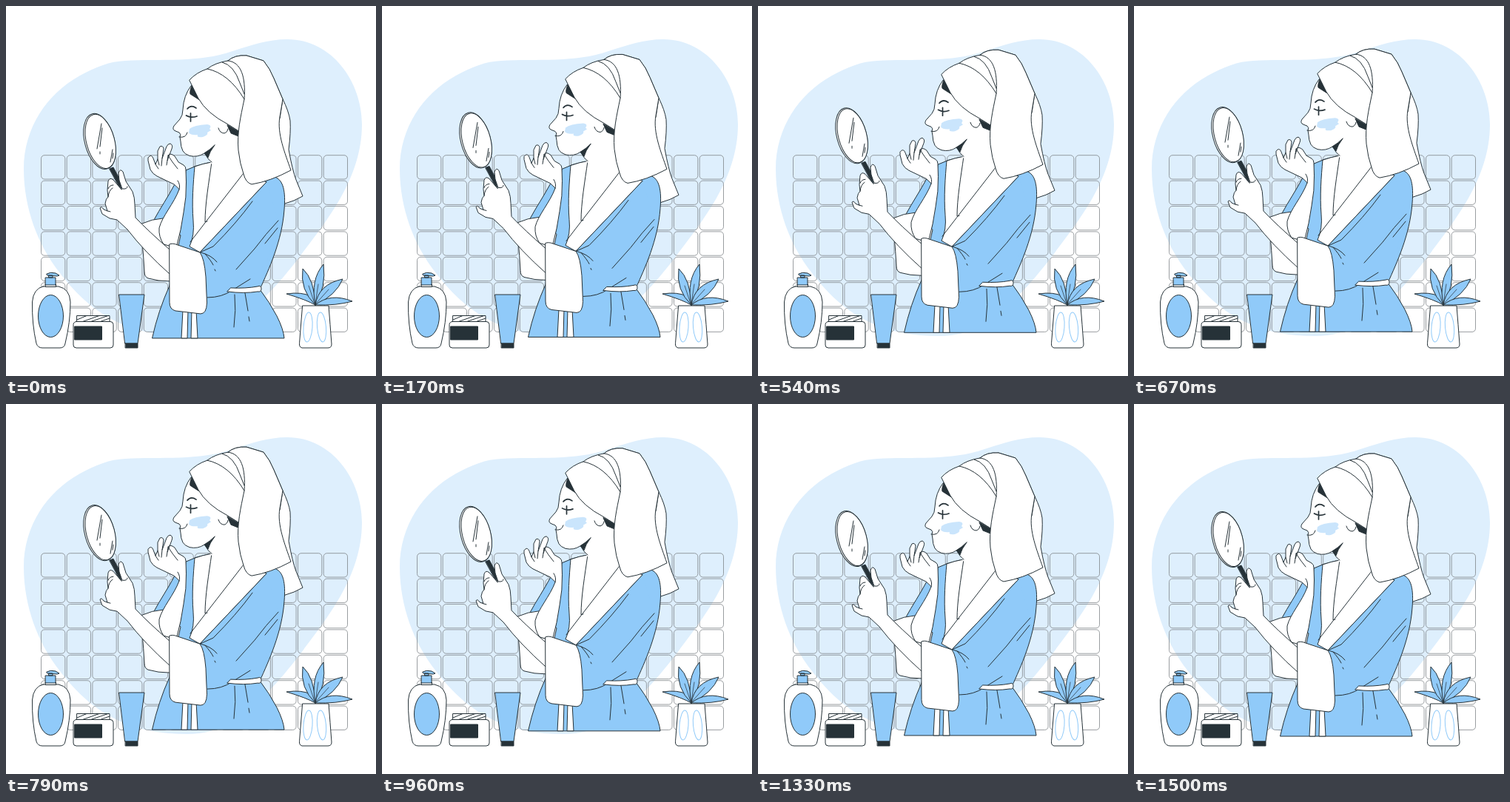
These frames come from a looping animation (500 by 500 pixels, 1.54 s). An HTML page:

```html
<!DOCTYPE html>
<html lang="en">
<head>
<meta charset="utf-8">
<title>Skin care</title>
<style>
  html, body { margin: 0; height: 100%; overflow: hidden; background: #fff; }
  svg { display: block; width: 100vw; height: 100vh; }
  .art { fill: #fff; stroke: #263238; stroke-width: 1; stroke-linecap: round; stroke-linejoin: round; }
  .blue { fill: #90caf9; }
  .dark { fill: #263238; }
  .line { fill: none; }
  #tiles { fill: none; stroke: #80868a; stroke-width: .8; }
</style>
</head>
<body>
<svg viewBox="0 0 500 500">
  <path fill="#deeffd" d="M24 220C24 165 55 119 100 94C122 82 140 75 161 74C210 71 261 77 306 61C331 53 354 45 380 45C441 45 481 103 481 160C481 235 430 294 396 340C383 357 367 376 353 390C322 424 290 446 245 446C160 446 112 412 73 361C43 323 24 273 24 220Z"/>
  <g id="tiles"></g>

  <g id="woman" class="art">
    <!-- towel end behind the shoulder -->
    <path d="M374 126Q382 142 384 155Q385 171 382 194Q387 222 392 235L401 257Q389 264 377 267L340 220Z"/>

    <!-- far sleeve and robe -->
    <path class="blue" d="M228 241C219 258 208 274 200 289L214 300L240 250Z"/>
    <path class="blue" d="M273 212Q257 215 243 222L236 300L221 378Q206 411 197.500 449H376Q375 437 366 419Q356 400 343 383C355 356 373 318 376 275C378 251 375 235 363 231L320 226Z"/>
    <path d="M184 294Q197 288 212 287L236 310L222 372Q205 372 192 368Q187 366 187 359Q186 340 184 318Z"/>

    <!-- neck and lapels -->
    <path d="M255 217Q266 213 278 211L323 224L352 238L262 333L248 325Q255 310 253 290C251 265 253 240 255 217Z"/>
    <path class="line" d="M278 211C274 239 269 268 269 292L272 291M321 226L269 293L249 319"/>
    <path stroke="none" d="M268 196L302 160L325 180V226L278 214Z"/>
    <path class="line" d="M269 199Q272 207 278 211"/>

    <!-- raised arm -->
    <path d="M234 248C227 267 211 284 207 300Q206 312 213 322L230 327Q237 302 240 279Q244 258 243.500 238L243 221Q243 217 240 215L233 211L228 203Q222 198 219 202L218 209L224 193Q226 188 222 186Q219 186 217 190L211 206L213 193Q212 188 208 190L205 196V207L202 214L199 206Q197 201 194 203Q191 204 192 209L195 221Q198 227 204 230L227 241Z"/>
    <path class="line" d="M202 214L206 220M205 207L207 215M211 206L210 216M218 209L217 215M219 202L225 211L232 220M234 248Q236 242 232 236"/>

    <!-- mirror -->
    <path class="dark" d="M140 220L145 218L156 239L154 246Z"/>
    <ellipse cx="126.500" cy="183" rx="20" ry="38.500" transform="rotate(-15 126.500 183)"/>
    <ellipse cx="127.700" cy="183" rx="19" ry="37.500" transform="rotate(-15 127.700 183)"/>
    <path class="line" d="M129 159L123 193M130 165L127 190M127 197V200M144 194L141 211M145 199L144 206"/>

    <!-- arm with mirror -->
    <path d="M153 236L152 226Q154 219 158 224L162 237L171 251Q174 259 174 268L175 286Q192 304 222 330V363Q187 332 164 302L150 289L140 287L130 281L127 273Q129 270 132 275L137 277L134 267Q135 260 138 258L137 249L138 237Q140 231 145 235L156 248Z"/>
    <path class="line" d="M138 258Q139 249 144 246M138 247Q140 242 145 242M137 277L141 278M153 236L157 247Q164 248 164 244"/>

    <!-- near sleeve, cuff, belt -->
    <path class="blue" stroke="none" d="M352 238L262 333L272 394Q296 394 308 384L352 348L368 290Z"/>
    <path class="line" d="M352 238L262 333M272 394Q292 394 306 384L330 369M333 264Q311 294 280 325L262 333M368 290Q351 308 336 328L311 356M367 300L350 321M263 333Q278 337 285 346M269 335Q277 344 280 350M282 356L283 358"/>
    <path d="M239 411L237 449H245L246 411ZM251 411L250 449H259L257 411Z"/>
    <path d="M221 322Q225 320 232 323L262 333Q268 341 270 366L271.500 401Q271 416 263 416L229 412Q221 410 221 401Z"/>
    <path d="M304 381Q324 382 340 379Q345 377 345 382T340 386Q322 389 299 386Z"/>
    <path class="line" d="M309 390Q311 411 308 434M323 388L327 412M328 420L329 426"/>

    <!-- head -->
    <path d="M250 108Q240 121 239 140Q239 148 235 153L227 162Q224 167 229 169L234 171Q237 173 235 177L236 183Q236 190 239 196Q241 200 248 202.500Q259 205 268 199Q278 194 284 187L308 168L300 120Z"/>
    <path stroke="none" d="M271 198L286 174L308 160V190H284Z"/>
    <path class="dark" d="M282 188Q276 194 268 199L273 205Q275 197 282 188ZM251 108Q248 115 249 119L263 128ZM299 161L304 172L314 176V169Z"/>
    <path class="line" d="M287 165Q289 172 295 172Q299 171 300 166M234 177Q243 179 245 171"/>
    <path class="line" stroke-width="1.700" d="M245 139Q250 133 257 138M243.500 148Q250 152 258 149M249.500 145V156"/>
    <path fill="#cae5fc" stroke="none" d="M248 166Q254 161 272 160Q279 161 275 166L277 168L272 171Q274 174 266 177Q257 178 259 174Q250 175 247 171Z"/>

    <!-- towel -->
    <path d="M248 100Q257 90 272 85Q282 77 300 74Q309 66 325 67L348 74Q357 85 362 98L374 126L370 152L316 170L300 160Q271 145 260 125Z"/>
    <path d="M300 74C318 76 324 96 322 126C317 150 312 171 314 195Q316 213 321 227Q324 239 332 241Q357 237 385 222C377 199 366 172 370 150L374 126L362 98Q357 85 348 74L325 67Q309 66 300 74Z"/>
    <path class="line" d="M272 85Q301 91 322 126M292 76Q308 80 316 104L322 119"/>
  </g>

  <!-- bottle -->
  <g class="art">
    <path d="M50 379H71Q86 382 87 400Q87 427 80 456Q79 462 73 462H49Q43 462 41 456Q35 430 35.500 400Q37 382 50 379Z"/>
    <ellipse class="blue" cx="60.500" cy="419" rx="17" ry="28.500"/>
    <path d="M53.500 376H67.500V379.500H53.500Z"/>
    <path class="blue" d="M53.500 367H67V377H53.500ZM58 364H63V367H58ZM55 362Q60 359 67 361L72 364L69 365L56 364Z"/>
  </g>

  <!-- jar and tube -->
  <g class="art">
    <path d="M96 418.500H140V427H96Z"/>
    <path class="line" d="M96 424L109 418.500M102 427L126 418.500M113 427L138 418.500M126 427L140 422"/>
    <rect x="91" y="426.500" width="54" height="35.500" rx="4"/>
    <path class="dark" d="M93 433H129.500V451H93Z"/>
    <path class="blue" d="M153 390H187L178 456H161Z"/>
    <path class="dark" d="M161.500 456H178V462H161.500Z"/>
  </g>

  <!-- plant -->
  <g class="art">
    <g class="blue">
      <path d="M418 404Q406 397 379 389Q400 386 411 392Z"/>
      <path d="M418 404Q397 384 401 355Q417 370 418 404Z"/>
      <path d="M418 404Q411 370 429 349Q433 380 418 404Z"/>
      <path d="M418 404Q422 376 455 369Q446 391 418 404Z"/>
      <path d="M418 404Q438 387 468 399Q447 405 418 404Z"/>
    </g>
    <path class="line" stroke-width=".7" d="M417 402L409 378M418 402L422 376M419 402L436 383"/>
    <path d="M401 405H436Q438 430 440 457Q440 462 435 462H400Q396 461 396.500 456Z"/>
    <g class="line" stroke="#90caf9">
      <ellipse cx="408" cy="434" rx="6" ry="20" transform="rotate(4 408 434)"/>
      <ellipse cx="426.500" cy="434" rx="6" ry="20" transform="rotate(-5 426.500 434)"/>
    </g>
  </g>
</svg>
<script>
  const LOOP = 1540, RISE = 9, LEAD = 40;
  const woman = document.getElementById('woman');

  let tiles = '';
  for (let row = 0; row < 7; row++)
    for (let col = 0; col < 12; col++)
      tiles += `<rect x="${47.5 + col * 34.7}" y="${201.7 + row * 34.4}" width="32.3" height="32.3" rx="4.5"/>`;
  document.getElementById('tiles').innerHTML = tiles;

  function draw(now) {
    const angle = (now + LEAD) / LOOP * 2 * Math.PI;
    const y = RISE * (Math.cos(angle) - 1) / 2;
    woman.setAttribute('transform', `translate(0 ${y.toFixed(2)})`);
    requestAnimationFrame(draw);
  }
  draw(performance.now());
</script>
</body>
</html>
```
